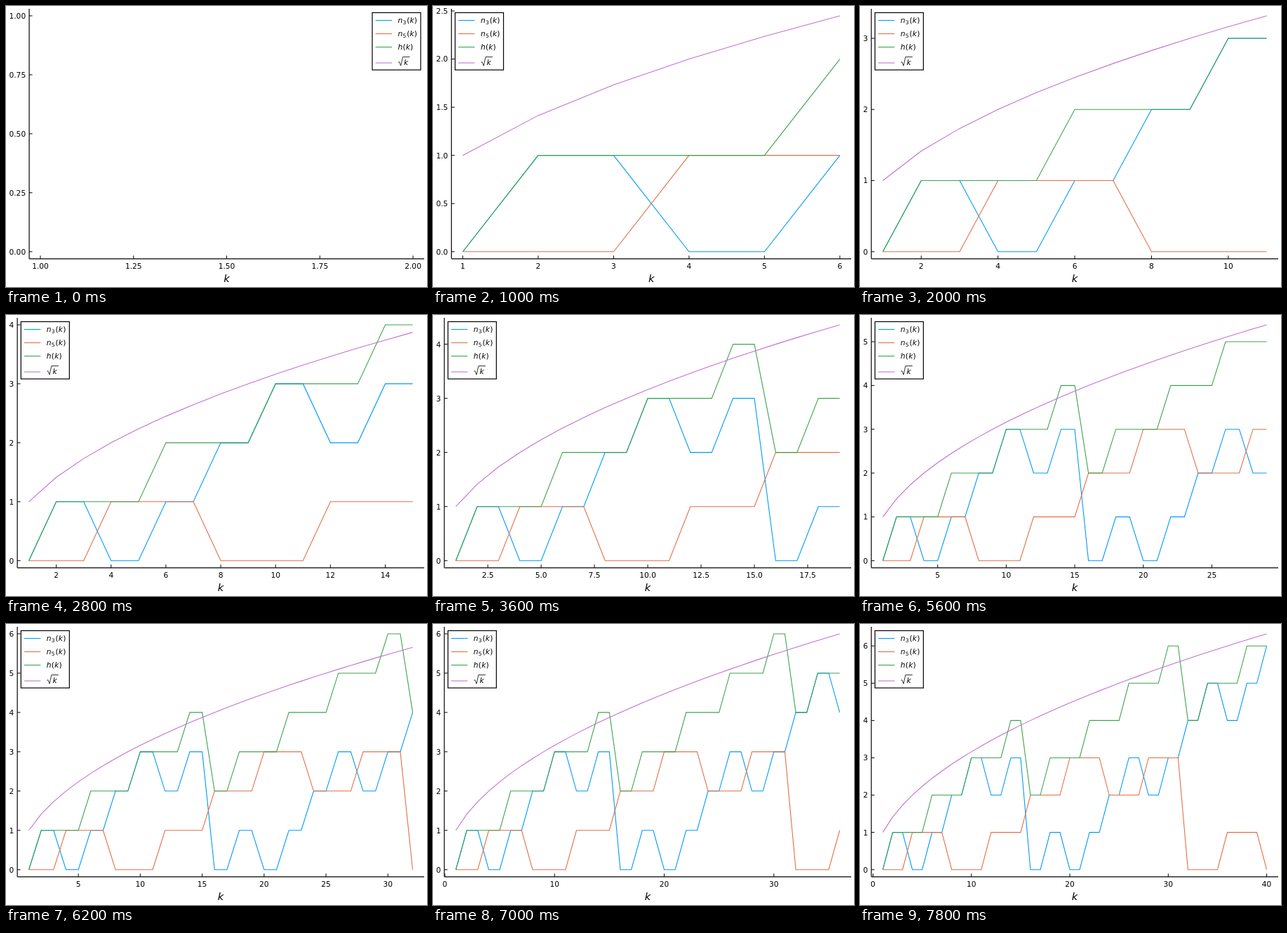
Write an HTML page with a canvas that moves like this. It is 600x400 px and loops after 8 s.

```html
<!DOCTYPE html>
<html lang="en">
<head>
<meta charset="utf-8">
<style>
  html, body { margin: 0; width: 100%; height: 100%; overflow: hidden; background: #fff; }
  canvas { display: block; }
</style>
</head>
<body>
<canvas id="plot" width="600" height="400"></canvas>
<script>
const ctx = document.getElementById('plot').getContext('2d');
const STEP_MS = 200, LAST_K = 40;
const TOP = 3.9, BOTTOM = 359.8, RIGHT = 596, MARGIN = 0.03;
const SANS = '"DejaVu Sans", sans-serif';
const TICK_FONT = `10.67px ${SANS}`;
const MATH_FONT = `italic 10.67px ${SANS}`;

// n3 packs the odd bits of k, n5 the even bits from 4 upwards.
const bit = (k, i) => (k >> i) & 1;
const n3 = k => bit(k, 1) + 2 * bit(k, 3) + 4 * bit(k, 5);
const n5 = k => bit(k, 2) + 2 * bit(k, 4);
const h = k => n3(k) + n5(k);
const series = [
  { f: n3, color: '#009afa' },
  { f: n5, color: '#e36f47' },
  { f: h, color: '#3ea44e' },
  { f: Math.sqrt, color: '#c371d2' },
];

function text(str, x, y, font, align = 'left') {
  ctx.font = font;
  ctx.textAlign = align;
  ctx.fillStyle = '#000';
  ctx.fillText(str, x, y);
}

function line(points, color = '#000', width = 1) {
  ctx.beginPath();
  points.forEach(([x, y]) => ctx.lineTo(x, y));
  ctx.strokeStyle = color;
  ctx.lineWidth = width;
  ctx.stroke();
}

function limits(min, max) {
  const pad = (max - min) * MARGIN;
  return { min: min - pad, max: max + pad };
}

// Picks the step that best balances tick count, coverage and roundness.
function ticks({ min, max }) {
  let best = { score: -Infinity };
  for (const power of [10, 1, 0.1]) {
    for (const [q, niceness] of [[5, 0.9], [3, 0.2], [2.5, 0.5], [2, 0.7], [1, 1]]) {
      const step = q * power;
      const first = Math.ceil(min / step), count = Math.floor(max / step) - first + 1;
      if (count < 4 || count > 8) continue;
      const score = (1 - Math.abs(count - 5) / 5) / 4
        + 0.5 * (max - min) / ((count - 1) * step) + niceness / 4;
      if (score > best.score + 1e-9) best = { score, step, first, count };
    }
  }
  const digits = [0, 1, 2].find(d => Math.abs(best.step * 10 ** d % 1) < 1e-9);
  return Array.from({ length: best.count }, (_, i) => {
    const value = (best.first + i) * best.step;
    return { value, label: value.toFixed(digits) };
  });
}

function drawLegend(x) {
  const y = 9.5;
  ctx.fillStyle = '#fff';
  ctx.fillRect(x, y, 69, 81.5);
  ctx.strokeStyle = '#000';
  ctx.lineWidth = 1.2;
  ctx.strokeRect(x, y, 69, 81.5);
  [20.5, 39.5, 58.5, 81].forEach((ly, i) =>
    line([[x + 4.6, ly], [x + 28, ly]], series[i].color, 1.1));

  const tx = x + 36.5;
  const argument = (ax, ay) => {
    text('(', ax, ay, TICK_FONT);
    text('k', ax + 4.3, ay, MATH_FONT);
    text(')', ax + 10.6, ay, TICK_FONT);
  };
  ['3', '5'].forEach((sub, i) => {
    const by = 24 + 19 * i;
    text('n', tx, by, MATH_FONT);
    text(sub, tx + 7, by + 1.8, `7.5px ${SANS}`);
    argument(tx + 12.7, by);
  });
  text('h', tx, 62, MATH_FONT);
  argument(tx + 7, 62);
  line([[tx + 0.5, 80.3], [tx + 2, 79.5], [tx + 4.2, 85], [tx + 7, 72.5], [tx + 17, 72.5]], '#000', 0.8);
  text('k', tx + 8.6, 84, MATH_FONT);
}

function draw(count) {
  const ks = Array.from({ length: count }, (_, i) => i + 1);
  const xLim = limits(1, Math.max(count, 2));
  const yLim = limits(0, Math.max(...ks.map(k => Math.max(h(k), Math.sqrt(k)))));
  const xTicks = ticks(xLim), yTicks = ticks(yLim);

  ctx.font = TICK_FONT;
  const left = 9.35 + ctx.measureText(yTicks[0].label).width;
  const scaleX = right => v => left + (v - xLim.min) / (xLim.max - xLim.min) * (right - left);
  const lastTick = xTicks[xTicks.length - 1];
  const labelEnd = scaleX(RIGHT)(lastTick.value) + ctx.measureText(lastTick.label).width / 2;
  const right = RIGHT - Math.max(0, labelEnd - 598.8);
  const px = scaleX(right);
  const py = v => BOTTOM - (v - yLim.min) / (yLim.max - yLim.min) * (BOTTOM - TOP);

  ctx.fillStyle = '#fff';
  ctx.fillRect(0, 0, 600, 400);

  line([[left, BOTTOM], [right, BOTTOM]], '#000', 1.2);
  line([[left, TOP], [left, BOTTOM]], '#000', 1.2);
  for (const { value, label } of xTicks) {
    const x = px(value);
    line([[x, BOTTOM], [x, BOTTOM - 4.5]]);
    text(label, x, 373.5, TICK_FONT, 'center');
  }
  for (const { value, label } of yTicks) {
    const y = py(value);
    line([[left, y], [left + 4.5, y]]);
    text(label, left - 4.9, y + 3.9, TICK_FONT, 'right');
  }
  text('k', (left + right) / 2, 393, `italic 14.67px ${SANS}`, 'center');

  for (const { f, color } of series) line(ks.map(k => [px(k), py(f(k))]), color, 1.1);
  drawLegend(count === 1 ? right - 74 : left + 5.2);
}

function frame() {
  draw(1 + Math.floor(performance.now() / STEP_MS) % LAST_K);
  requestAnimationFrame(frame);
}
frame();
</script>
</body>
</html>
```
